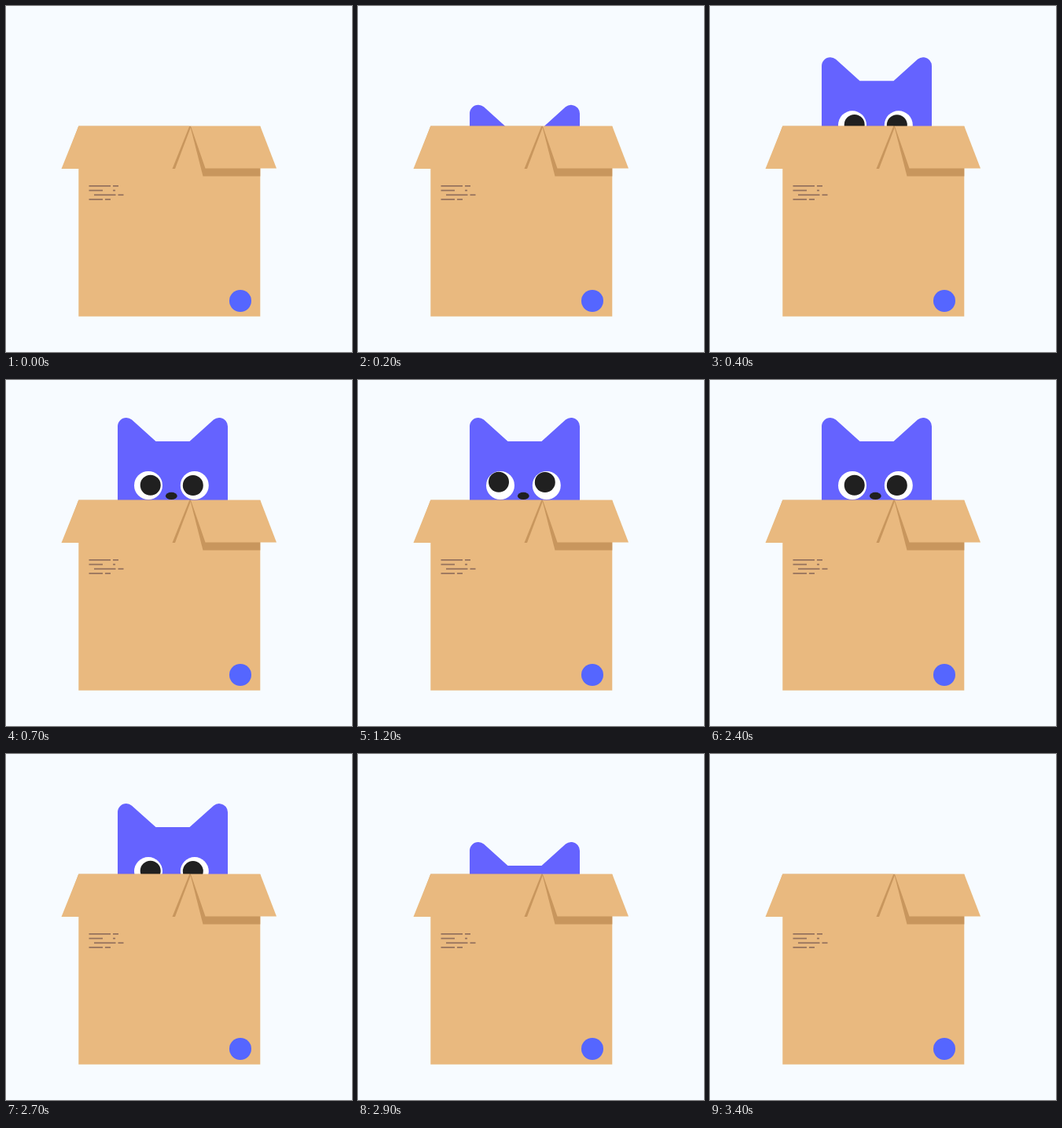
An HTML page with a canvas that plays this animation: 440x440 px, repeating every 3.5 s.

```html
<!DOCTYPE html>
<html lang="en">
<head>
<meta charset="utf-8">
<title>Cat in a box</title>
<style>
html, body { margin: 0; width: 100%; height: 100%; overflow: hidden; background: #f7fbff; }
canvas { display: block; width: 440px; height: 440px; }
</style>
</head>
<body>
<canvas id="stage"></canvas>
<script>
const LOOP = 3500, STEP = 100, HIDE = 128;
const BG = '#f7fbff', CARD = '#e9b97f', SHADE = '#c8965d', CAT = '#6563ff', INK = '#202020';
const LEFT = 92.3, RIGHT = 323.3, TOP = 152.7, BOTTOM = 394.8, FOLD = 207;
const canvas = document.getElementById('stage');
const ctx = canvas.getContext('2d');
const ratio = window.devicePixelRatio || 1;
canvas.width = canvas.height = 440 * ratio;
ctx.scale(ratio, ratio);

function ease(t, from, to) {
  const u = Math.min(1, Math.max(0, (t - from) / (to - from)));
  return u * u * (3 - 2 * u);
}

function disc(color, x, y, r) {
  ctx.fillStyle = color;
  ctx.beginPath();
  ctx.arc(x, y, r, 0, Math.PI * 2);
  ctx.fill();
}

// Four-sided panel with level top and bottom edges.
function panel(color, x1, x2, top, x3, x4, bottom) {
  ctx.fillStyle = color;
  ctx.beginPath();
  ctx.moveTo(x1, top);
  ctx.lineTo(x2, top);
  ctx.lineTo(x4, bottom);
  ctx.lineTo(x3, bottom);
  ctx.fill();
}

function flap(color, x1, x2, lean) {
  panel(color, x1, x2, TOP, x1 + lean, x2 + lean, FOLD);
}

function drawHead() {
  const mid = 212, half = 70, ear = 11, tilt = 0.88;
  ctx.fillStyle = CAT;
  ctx.beginPath();
  ctx.moveTo(mid - half, 300);
  ctx.arc(mid - half + ear, 59, ear, Math.PI, -tilt);
  ctx.lineTo(mid - 21.5, 78);
  ctx.lineTo(mid + 21.5, 78);
  ctx.arc(mid + half - ear, 59, ear, Math.PI + tilt, 0);
  ctx.lineTo(mid + half, 300);
  ctx.fill();
}

function drawNose() {
  ctx.fillStyle = INK;
  ctx.beginPath();
  ctx.ellipse(210.3, 147.4, 7.4, 4.6, 0, 0, Math.PI * 2);
  ctx.fill();
}

function drawCat(t) {
  const drop = HIDE * (1 - ease(t, -50, 535) + ease(t, 2550, 3250));
  const left = ease(t, 700, 1050);
  const right = ease(t, 1350, 1750);
  const back = ease(t, 2000, 2350);
  const lift = 4 * (left - back);
  ctx.save();
  ctx.translate(0, drop);
  drawHead();
  disc('#fff', 181, 134, 18);
  disc('#fff', 239.8, 134, 18);
  disc(INK, 183.7 - 4.7 * (left - right), 133.7 - lift, 13);
  disc(INK, 237.8 + 4.7 * (right - back), 134 - lift, 13);
  drawNose();
  ctx.restore();
}

function drawLabel() {
  ctx.fillStyle = '#93705c';
  for (let i = 0; i < 4; i++) {
    const x = i === 2 ? 112 : 105.5;
    const y = 228 + 5.7 * i;
    const long = i % 2 ? 17.5 : 27.5;
    const gap = i === 1 ? 13 : 3;
    const tail = i === 1 ? 3 : 7;
    ctx.fillRect(x, y, long, 1.7);
    ctx.fillRect(x + long + gap, y, tail, 1.7);
  }
}

function drawBox() {
  panel(CARD, LEFT, RIGHT, TOP, LEFT, RIGHT, BOTTOM);
  flap(SHADE, LEFT, 235.5, -20.5);
  panel(SHADE, 234.5, RIGHT, TOP + 1, 250.5, RIGHT, 216.6);
  flap(CARD, LEFT, 233.3, -21.8);
  panel(CARD, 235, RIGHT, TOP, 253.5, 344, FOLD - 0.5);
  drawLabel();
  disc('#5566ff', 298, 375, 14);
}

function frame() {
  const t = Math.floor((performance.now() % LOOP) / STEP) * STEP;
  ctx.fillStyle = BG;
  ctx.fillRect(0, 0, 440, 440);
  // The cat only shows above the rim.
  ctx.save();
  ctx.beginPath();
  ctx.rect(0, 0, 440, TOP + 1);
  ctx.clip();
  drawCat(t);
  ctx.restore();
  drawBox();
  requestAnimationFrame(frame);
}
frame();
</script>
</body>
</html>
```
